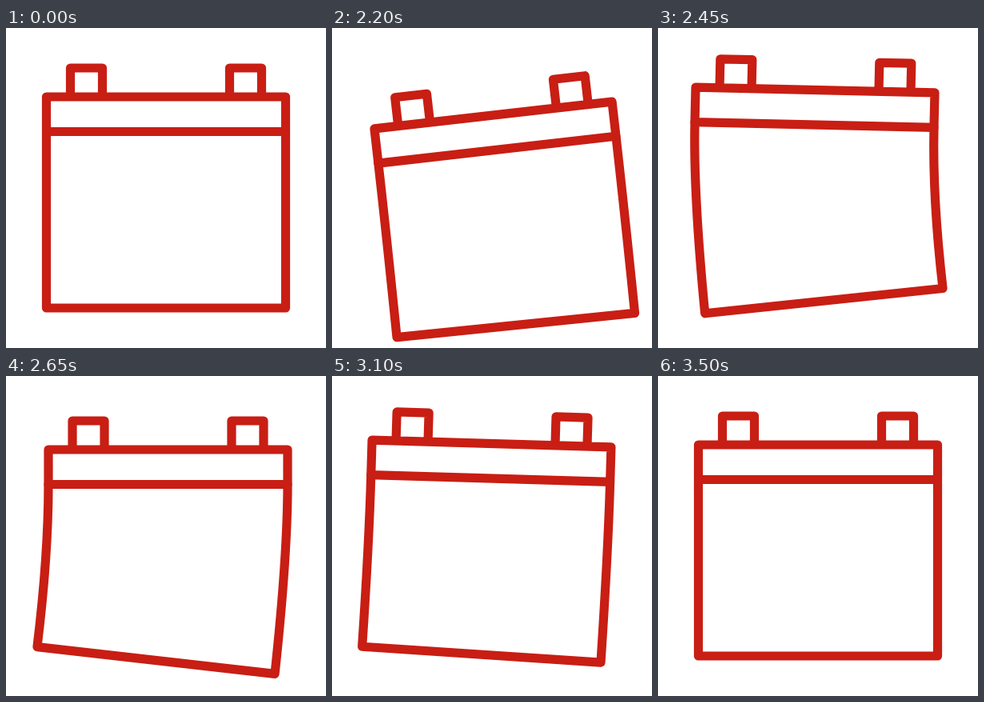
An HTML page for the animation above (3.52 s loop, 400x400 px).

```html
<!DOCTYPE html>
<html lang="en">
<head>
<meta charset="utf-8">
<title>Swinging calendar</title>
<style>
  html, body { margin: 0; height: 100%; overflow: hidden; background: #fff; }
  svg { display: block; width: 100vw; height: 100vh; }
  path { fill: none; stroke: #c81e14; stroke-width: 11.2; stroke-linejoin: round; stroke-linecap: round; }
</style>
</head>
<body>
<svg viewBox="0 0 400 400">
  <path id="body"/>
  <path id="header" d="M-149.5 43.5V0H149.5V43.5ZM-119.5 0V-36H-79.5V0M79.5 0V-36H119.5V0"/>
</svg>
<script>
const LOOP = 3520, START = 2020, STEP = 25;
const TOP = 86, HEADER = 43.5, BODY = 220.5, HALF = 149.5;

// time, header shift x and y, header angle, bottom edge angle (degrees)
const poses = [
  [2000, 0, 0, 0, 0],
  [2025, 0, 2.2, -0.1, 0],
  [2200, 1.5, 23, -6.5, -5.8],
  [2290, 0, 9, -6, -9.5],
  [2450, -3.5, -8.5, 1.3, -6],
  [2520, -1, -6, 3, 1.5],
  [2580, 1.5, -2, 2, 6.5],
  [2650, 2.5, 6, 0, 6.5],
  [2740, 1, 2, -2.5, 0],
  [2830, 0, -2, -2.5, -5],
  [2960, 0, -1, 0.5, -1],
  [3100, -0.5, -1.5, 1.7, 3.8],
  [3220, 0, 0, 1, 1.8],
  [3350, 0, 0, 0, 0.2],
  [3500, 0, 0, 0, 0]
];

const body = document.getElementById("body");
const header = document.getElementById("header");

function slope(i, c) {
  const a = poses[i - 1], b = poses[i + 1];
  return a && b ? (b[c] - a[c]) / (b[0] - a[0]) : 0;
}

// Smooth Hermite curve through the poses
function poseAt(t) {
  if (t >= 3500 || t <= 2000) return [0, 0, 0, 0];
  const i = poses.findIndex(p => p[0] > t) - 1;
  const a = poses[i], b = poses[i + 1], span = b[0] - a[0];
  const u = (t - a[0]) / span, v = 1 - u;
  return [1, 2, 3, 4].map(c =>
    v * v * (1 + 2 * u) * a[c] + u * u * (3 - 2 * u) * b[c] +
    span * u * v * (v * slope(i, c) - u * slope(i + 1, c)));
}

// Moves a point by dx, dy in axes turned by the angle
function move([x, y], angle, dx, dy) {
  const r = angle * Math.PI / 180, c = Math.cos(r), s = Math.sin(r);
  return [x + dx * c - dy * s, y + dx * s + dy * c];
}

function draw(time) {
  const [x, y, tilt, sway] = poseAt(time);
  const top = [200 + x, TOP + y];
  const fold = move(top, tilt, 0, HEADER);
  const bottom = move(fold, 0.4 * tilt + 0.6 * sway, 0, BODY);
  const [left, right] = [-HALF, HALF].map(dx => {
    const corner = move(fold, tilt, dx, 0);
    return { corner, bend: move(corner, tilt, 0, 0.4 * BODY), end: move(bottom, sway, dx, 0) };
  });
  header.setAttribute("transform", `translate(${top}) rotate(${tilt})`);
  body.setAttribute("d",
    `M${left.corner}Q${left.bend} ${left.end}L${right.end}Q${right.bend} ${right.corner}`);
}

function frame(now) {
  const t = Math.floor(now % LOOP / 10) * 10;
  draw(t < START ? 0 : START + 5 + Math.floor((t - START) / STEP) * STEP);
  requestAnimationFrame(frame);
}
frame(performance.now());
</script>
</body>
</html>
```
